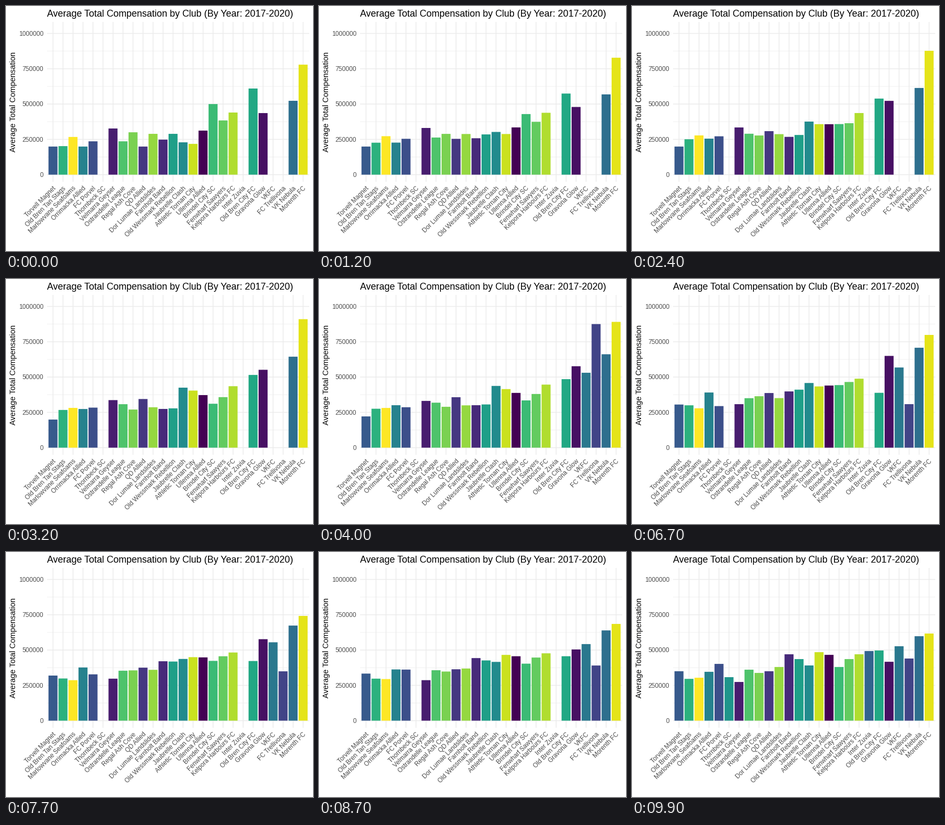
A matplotlib script that plays this animation: 576 px wide and 460 px high, repeating every 10000 ms.

```python
import matplotlib.pyplot as plt
from matplotlib.animation import FuncAnimation

plt.rcParams["font.family"] = "Liberation Sans"

W, H, DPI = 576, 460, 80
LEFT, RIGHT, TOP, BOTTOM = 76.9, 568.7, 30.2, 330.3
FRAMES, STEP = 100, 33
PEAK = 1029

# name, colour rank, average pay in thousands for 2017-2020
CLUBS = [
    ("Torvell Magnet", 7, (199, 199, 304, 350)),
    ("Old Bren Tan Stags", 16, (202, 269, 300, 296)),
    ("Marlowvane Seafoams", 25, (267, 282, 278, 304)),
    ("Orrimacka Allied", 11, (199, 276, 392, 346)),
    ("FC Porvel", 6, (236, 285, 291, 402)),
    ("Thornbeck SC", 13, (None, None, None, 308)),
    ("Velmarra Geyser", 2, (327, 337, 309, 274)),
    ("Ostrandelle League", 18, (236, 310, 350, 361)),
    ("Regal Ash Cove", 20, (300, 269, 365, 338)),
    ("QD Allied", 4, (199, 349, 388, 350)),
    ("Dor Lumae Landslides", 21, (289, 286, 350, 380)),
    ("Farnholt Band", 3, (248, 275, 396, 470)),
    ("Old Wessmark Rebellion", 14, (289, 278, 410, 436)),
    ("Jaubrelle Clash", 12, (229, 431, 460, 391)),
    ("Athletic Tornan City", 23, (218, 410, 432, 485)),
    ("Ullenna Allied", 0, (312, 374, 439, 466)),
    ("Brindel City SC", 17, (500, 305, 445, 380)),
    ("Fenwharf Sawyers", 19, (384, 357, 466, 436)),
    ("Kelpora Harbours FC", 22, (440, 435, 489, 470)),
    ("Inter Zuvia", 8, (None, None, None, 493)),
    ("Old Bren City FC", 15, (610, 512, 385, 497)),
    ("Gravona Glow", 1, (436, 555, 657, 417)),
    ("VKFC", 10, (None, 520, 569, 527)),
    ("FC Trellivona", 5, (None, 1029, 304, 440)),
    ("VK Nebula", 9, (523, 648, 711, 598)),
    ("Morenth FC", 24, (779, 914, 804, 617)),
]
N = len(CLUBS)

fig = plt.figure(figsize=(W / DPI, H / DPI), dpi=DPI, facecolor="white")
ax = fig.add_axes([LEFT / W, 1 - BOTTOM / H, (RIGHT - LEFT) / W, (BOTTOM - TOP) / H])
ax.set_xlim(0.4, N + 0.6)
ax.set_ylim(-0.05 * PEAK, 1.05 * PEAK)
ax.axis("off")


def pt(px):
    return px * 72 / DPI


def label(x, y, text, px, color="black", **kw):
    """Text with its anchor in pixels from the top left."""
    kw.setdefault("va", "baseline")
    fig.text(x / W, 1 - y / H, text, fontsize=pt(px), color=color,
             rotation_mode="anchor", **kw)


def pixel_x(i):
    return LEFT + (i + 0.6) * (RIGHT - LEFT) / (N + 0.2)


def pixel_y(value):
    return BOTTOM - (value / PEAK + 0.05) / 1.1 * (BOTTOM - TOP)


grid = dict(color="#ebebeb", snap=False, zorder=0)
for value in range(125, 1000, 250):
    ax.axhline(value, lw=pt(0.71), **grid)
for value in range(0, 1001, 250):
    ax.axhline(value, lw=pt(1.42), **grid)
    label(70.3, pixel_y(value) + 4.2, str(value * 1000), 11.73, "#4d4d4d", ha="right")
for i, (name, _, _) in enumerate(CLUBS):
    ax.axvline(i + 1, lw=pt(1.42), **grid)
    label(pixel_x(i) + 5.9, BOTTOM + 12.5, name, 11.73, "#4d4d4d", ha="right", rotation=45)

label(LEFT, 19.9, "Average Total Compensation by Club (By Year: 2017-2020)", 17.6, ha="left")
label(17.8, (TOP + BOTTOM) / 2, "Average Total Compensation", 14.67, ha="center", rotation=90)

colors = [plt.cm.viridis(rank / (N - 1)) for _, rank, _ in CLUBS]
bars = ax.bar(range(1, N + 1), [0] * N, width=0.9, color=colors, lw=0, snap=False, zorder=2)


def pay_at(pay, frame):
    year, k = divmod(frame, STEP)
    if pay[year] is None:
        return 0
    if k == 0:
        return pay[year]
    return pay[year] + (pay[year + 1] - pay[year]) * k / STEP


def update(frame):
    for bar, (_, _, pay) in zip(bars, CLUBS):
        bar.set_height(pay_at(pay, frame))
    return list(bars)


anim = FuncAnimation(fig, update, frames=FRAMES, interval=100, repeat=True,
                     repeat_delay=0, blit=False)
plt.show()
```
